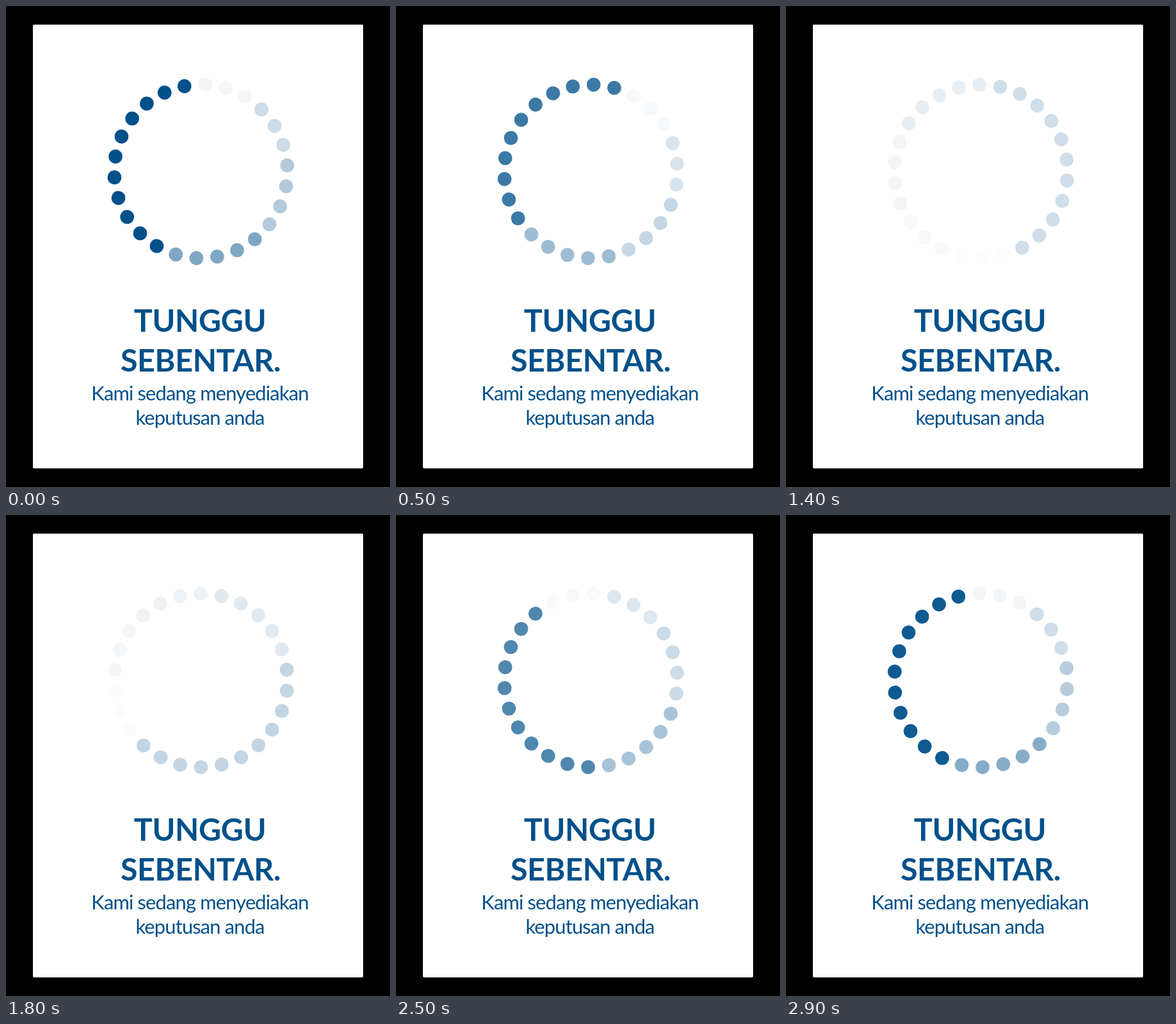
These frames come from a looping animation (600x750 px, 3000 ms). An HTML page:

```html
<!DOCTYPE html>
<html lang="ms">
<head>
<meta charset="utf-8">
<title>Tunggu sebentar</title>
<style>
  html, body { margin: 0; width: 100%; height: 100%; overflow: hidden; background: #000; }
  svg { display: block; width: 600px; height: 750px; }
  text { font-family: Lato, "Open Sans", sans-serif; text-anchor: middle; fill: #00508a; }
  .title { font-size: 48.5px; font-weight: 700; letter-spacing: -.4px; }
  .note { font-size: 31px; letter-spacing: -.9px; }
</style>
</head>
<body>
<svg viewBox="0 0 600 750">
  <rect x="42" y="29" width="516" height="692" rx="2" fill="#fff"/>
  <g id="ring" fill="#00508a"></g>
  <text class="title" x="303" y="508">TUNGGU</text>
  <text class="title" x="304" y="570">SEBENTAR.</text>
  <text class="note" x="303" y="615">Kami sedang menyediakan</text>
  <text class="note" x="303" y="653">keputusan anda</text>
</svg>
<script>
  const LOOP = 3000, STEP = 100;
  const CX = 304.4, CY = 257.9, R = 135.3, DOT = 10.9;
  const ring = document.getElementById('ring');

  // [dots, opacity], clockwise from the gap
  const groups = [[3, .05], [3, .2], [4, .3], [5, .5], [11, 1]];
  const shades = groups.flatMap(([n, o]) => Array(n).fill(o));
  shades.forEach((opacity, i) => {
    const a = (i + 1) / shades.length * 2 * Math.PI;
    const c = document.createElementNS('http://www.w3.org/2000/svg', 'circle');
    c.setAttribute('cx', CX + R * Math.sin(a));
    c.setAttribute('cy', CY - R * Math.cos(a));
    c.setAttribute('r', DOT);
    c.setAttribute('opacity', opacity);
    ring.append(c);
  });

  // [ms, degrees, degrees per 100 ms]
  const turn = [
    [0, -10.9, 4], [500, 15.7, 9], [900, 67.3, 15.4], [1400, 151.4, 17.3],
    [2200, 284.1, 13.6], [2700, 336.3, 5.8], [2900, 345, 4], [3000, 349.1, 4]
  ];

  function angle(t) {
    const i = turn.findIndex(k => k[0] > t);
    const [t0, a, va] = turn[i - 1], [t1, b, vb] = turn[i];
    const span = t1 - t0, u = (t - t0) / span, w = 1 - u;
    return a * w * w * (1 + 2 * u) + b * u * u * (3 - 2 * u)
      + span / 100 * u * w * (va * w - vb * u);
  }

  // Linear fade down to .08 and back, held briefly at full strength
  const fade = t => Math.min(1, .08 + .00064 * Math.abs(t - 1561));

  function draw() {
    const t = Math.floor(performance.now() % LOOP / STEP) * STEP;
    ring.setAttribute('transform', `rotate(${angle(t)} ${CX} ${CY})`);
    ring.setAttribute('opacity', fade(t));
    requestAnimationFrame(draw);
  }
  draw();
</script>
</body>
</html>
```
